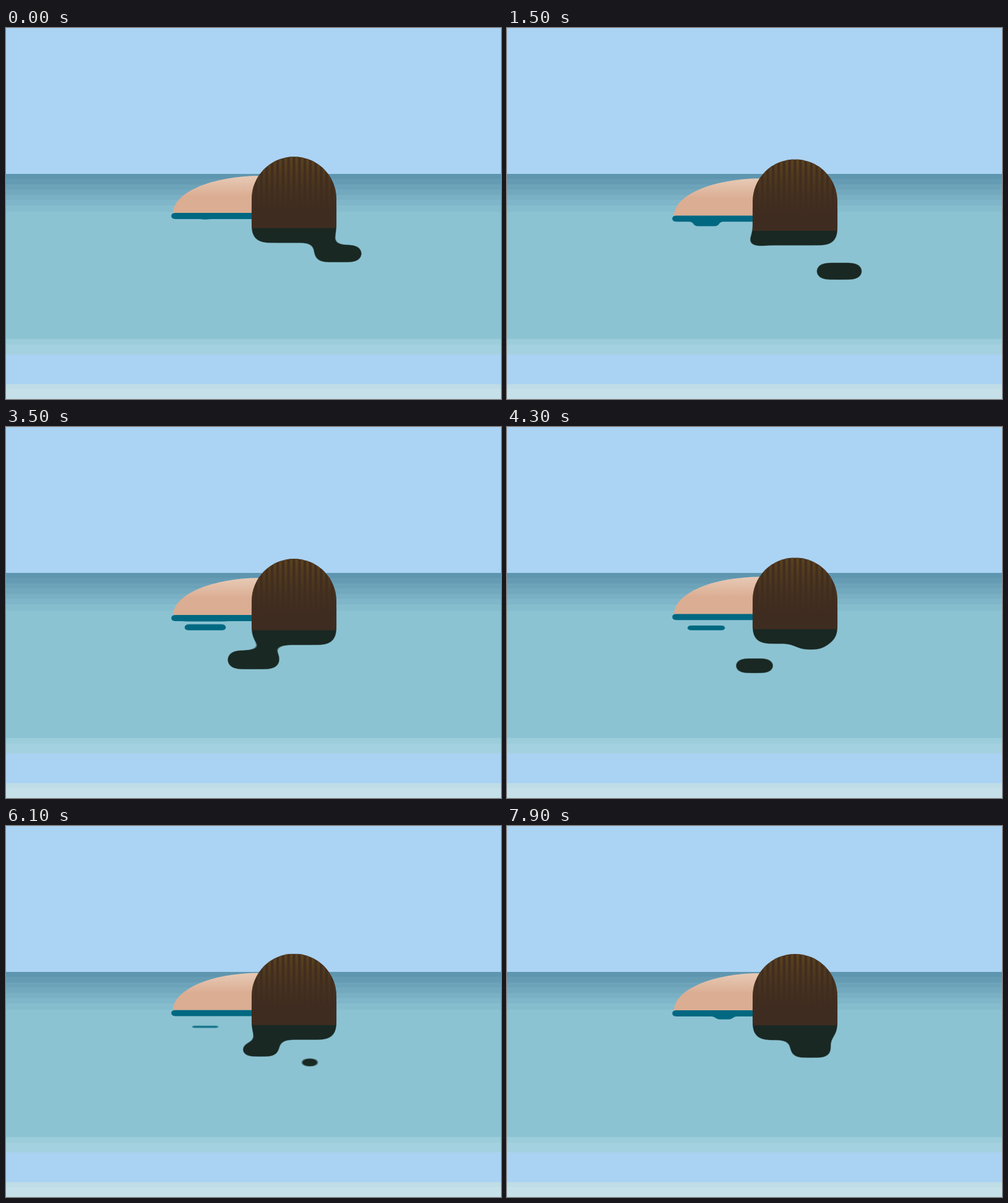
An HTML page for the animation above (8000 ms loop, 800x600 px).

```html
<!DOCTYPE html>
<html lang="en">
<head>
<meta charset="utf-8">
<title>Floating in the sea</title>
<style>
  html, body { margin: 0; width: 100%; height: 100%; overflow: hidden; background: #abd3f3; }
  svg { display: block; width: 800px; height: 600px; }
</style>
</head>
<body>
<svg viewBox="0 0 800 600">
  <defs>
    <linearGradient id="skin" x2="0" y2="1">
      <stop offset="0" stop-color="#e7cab6"/>
      <stop offset=".55" stop-color="#dbad92"/>
    </linearGradient>
    <linearGradient id="hair" x2="0" y2="1">
      <stop offset="0" stop-color="#432f1e"/>
      <stop offset=".8" stop-color="#3f2c20"/>
    </linearGradient>
    <linearGradient id="strand" gradientUnits="userSpaceOnUse" x1="0" x2="0" y1="0" y2="86">
      <stop offset="0" stop-color="#5c421f"/>
      <stop offset="1" stop-color="#49351e" stop-opacity="0"/>
    </linearGradient>
    <clipPath id="headShape"><path d="M397 115.7V68.5a68.5 68.5 0 0 1 137 0V115.7Z"/></clipPath>
    <!-- Blur, then threshold the alpha so that nearby shapes melt together -->
    <filter id="gooDark" filterUnits="userSpaceOnUse" x="300" y="20" width="340" height="260" color-interpolation-filters="sRGB">
      <feGaussianBlur stdDeviation="10"/>
      <feColorMatrix values="0 0 0 0 .098  0 0 0 0 .157  0 0 0 0 .137  0 0 0 20 -9.5"/>
    </filter>
    <filter id="gooTeal" filterUnits="userSpaceOnUse" x="240" y="60" width="240" height="90" color-interpolation-filters="sRGB">
      <feGaussianBlur stdDeviation="3"/>
      <feColorMatrix values="0 0 0 0 .004  0 0 0 0 .408  0 0 0 0 .506  0 0 0 8 -3.5"/>
    </filter>
  </defs>
  <g id="sea"></g>
  <g id="swimmer">
    <g id="teal" filter="url(#gooTeal)"><rect x="266.5" y="91" width="180" height="10" rx="2"/></g>
    <path d="M270 91A140 60 0 0 1 410 31H440V91Z" fill="url(#skin)"/>
    <g id="dark" filter="url(#gooDark)"><rect x="397" y="50" width="137" height="89.3" rx="20" ry="13"/></g>
    <g id="head" clip-path="url(#headShape)"><rect x="397" width="137" height="115.7" fill="url(#hair)"/></g>
  </g>
</svg>
<script>
const LOOP = 8000, STEP = 100;
const byId = id => document.getElementById(id);
const clamp = v => Math.max(0, Math.min(1, v));
const mix = (a, b, k) => a + (b - a) * k;

function addRect(parent, attrs = {}) {
  const rect = document.createElementNS('http://www.w3.org/2000/svg', 'rect');
  for (const name in attrs) rect.setAttribute(name, attrs[name]);
  return parent.appendChild(rect);
}

const addBand = (y, fill) => addRect(byId('sea'), { x: 0, y, width: 800, height: 600 - y, fill });

// Far water brightens in equal steps, then come the flat sea and the shore
for (let i = 0; i < 7; i++) {
  const [r, g, b] = [95, 150, 175].map((low, c) => Math.round(mix(low, [140, 195, 211][c], i / 7)));
  addBand(Math.floor(236 + 8.5 * i), `rgb(${r}, ${g}, ${b})`);
}
addBand(297, '#8cc3d2');
addBand(503, '#9ccddb');
addBand(512, '#a4d1df');
addBand(528, '#aad2f3');
addBand(576, '#bfdde7');
addBand(584, '#c6e0e9');

for (let x = 397.2; x < 534; x += 8.8) {
  addRect(byId('head'), { x, y: 0, width: 4.4, height: 86, fill: 'url(#strand)' });
}

// Each dark drop sinks evenly between two depths over its life
const darkDrops = [
  { x: 537, born: -2944, end: 3040, from: 109, to: 206 },
  { x: 400, born: 260, end: 5640, from: 117, to: 194 },
  { x: 491, born: 2476, end: 7018, from: 104, to: 194 },
  { x: 411, born: 3700, end: 8640, from: 110, to: 203 },
  { x: 491, born: 5340, end: 9900, from: 104, to: 196 }
];
const tealDrops = [{ x: 322, born: -400 }, { x: 351, born: 6600 }];
for (const drop of darkDrops) drop.rect = addRect(byId('dark'));
for (const drop of tealDrops) drop.rect = addRect(byId('teal'), { rx: 2 });

function place(rect, x, y, w, h) {
  rect.setAttribute('x', x - w / 2);
  rect.setAttribute('y', y - h / 2);
  rect.setAttribute('width', w);
  rect.setAttribute('height', h);
}

function drawDark({ rect, x, born, end, from, to }, t) {
  const scale = clamp(Math.min((t - born) / 3200, (end - t) / 1715));
  rect.setAttribute('rx', 14 * scale);
  rect.setAttribute('ry', 8 * scale);
  place(rect, x, mix(from, to, (t - born) / (end - born)), 88 * scale, 30.5 * scale);
}

function drawTeal({ rect, x, born }, t) {
  const age = Math.max(0, t - born);
  const p = clamp(age / 7400);
  const sink = (p + Math.sin(p * Math.PI / 2)) / 2;
  const fall = clamp((9600 - age) / 6000);
  place(rect, x, mix(95.5, 120, sink), 70 * clamp(age / 3200) * Math.sqrt(fall), 9.6 * fall);
}

function draw(t) {
  const top = 209.8 + 4 * Math.cos(2 * Math.PI * (t - 2690) / 8400);
  byId('swimmer').setAttribute('transform', `translate(0 ${top.toFixed(2)})`);
  for (const drop of darkDrops) drawDark(drop, t);
  for (const drop of tealDrops) drawTeal(drop, t);
}

const start = performance.now();
function tick() {
  const t = (performance.now() - start) % LOOP;
  draw(t < 200 ? 0 : Math.floor(t / STEP) * STEP);
  requestAnimationFrame(tick);
}
tick();
</script>
</body>
</html>
```
